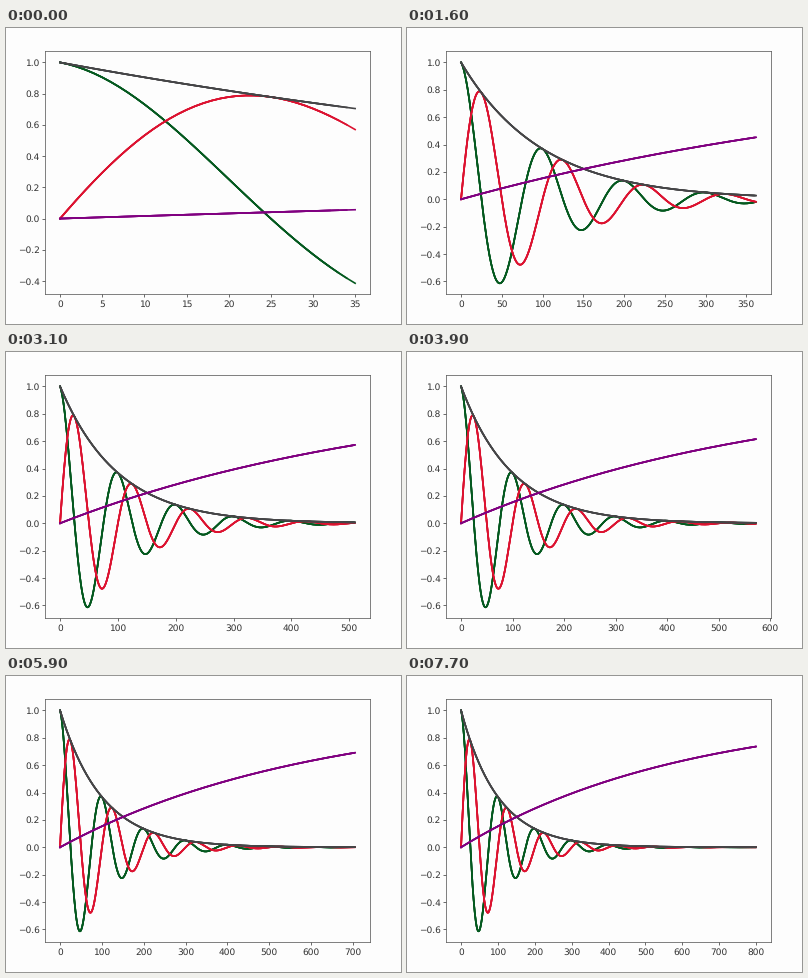
A matplotlib script for the animation above (7800 ms loop, 395 by 296 pixels).

```python
import numpy as np
import matplotlib.pyplot as plt
from matplotlib.animation import FuncAnimation

W, H, DPI = 395, 296, 64
FRAMES, INTERVAL = 78, 100
PASSES = 4  # each curve is overdrawn, its newest end less often
INK = "#333333"

plt.rcParams.update({
    "font.family": "DejaVu Sans", "font.size": 10.2,
    "text.hinting": "no_hinting", "axes.edgecolor": "#505050",
    "xtick.color": INK, "ytick.color": INK,
    "xtick.major.pad": 3.2, "ytick.major.pad": 2.8,
})

t = np.arange(801)
decay = np.exp(-t / 100)
phase = 2 * np.pi * t / 100
curves = [
    (decay * np.cos(phase), "#04591f"),
    (decay * np.sin(phase), "#dc1230"),
    (decay, "#454547"),
    (1 - np.exp(-t / 600), "purple"),
]

# Steps reached at a few frames; growth slows roughly like a square root.
KEY_FRAMES = [0, 8, 24, 39, 51, 59, 77]
KEY_STEPS = np.array([35, 247, 448, 573, 655, 705, 800])


def steps_at(frame):
    return int(round(np.sqrt(np.interp(frame, KEY_FRAMES, KEY_STEPS**2))))


fig = plt.figure(figsize=(W / DPI, H / DPI), dpi=DPI, facecolor="#fdfdfd")
left, right, top, bottom = 39.3, 363.9, 23.4, 266.3
ax = fig.add_axes([left / W, 1 - bottom / H, (right - left) / W, (bottom - top) / H])
ax.set_facecolor("#fdfdfd")

lines = [
    [ax.plot([], [], color=color, lw=1.85)[0] for _ in range(PASSES)]
    for _, color in curves
]


def update(frame):
    end = steps_at(frame)
    for (y, _), copies in zip(curves, lines):
        for lag, line in enumerate(copies):
            n = end + 1 - lag
            line.set_data(t[:n], y[:n])
    ax.relim()
    ax.autoscale_view()
    return [line for copies in lines for line in copies]


anim = FuncAnimation(fig, update, frames=FRAMES, interval=INTERVAL,
                     init_func=lambda: update(0), repeat=True, repeat_delay=0)
plt.show()
```
